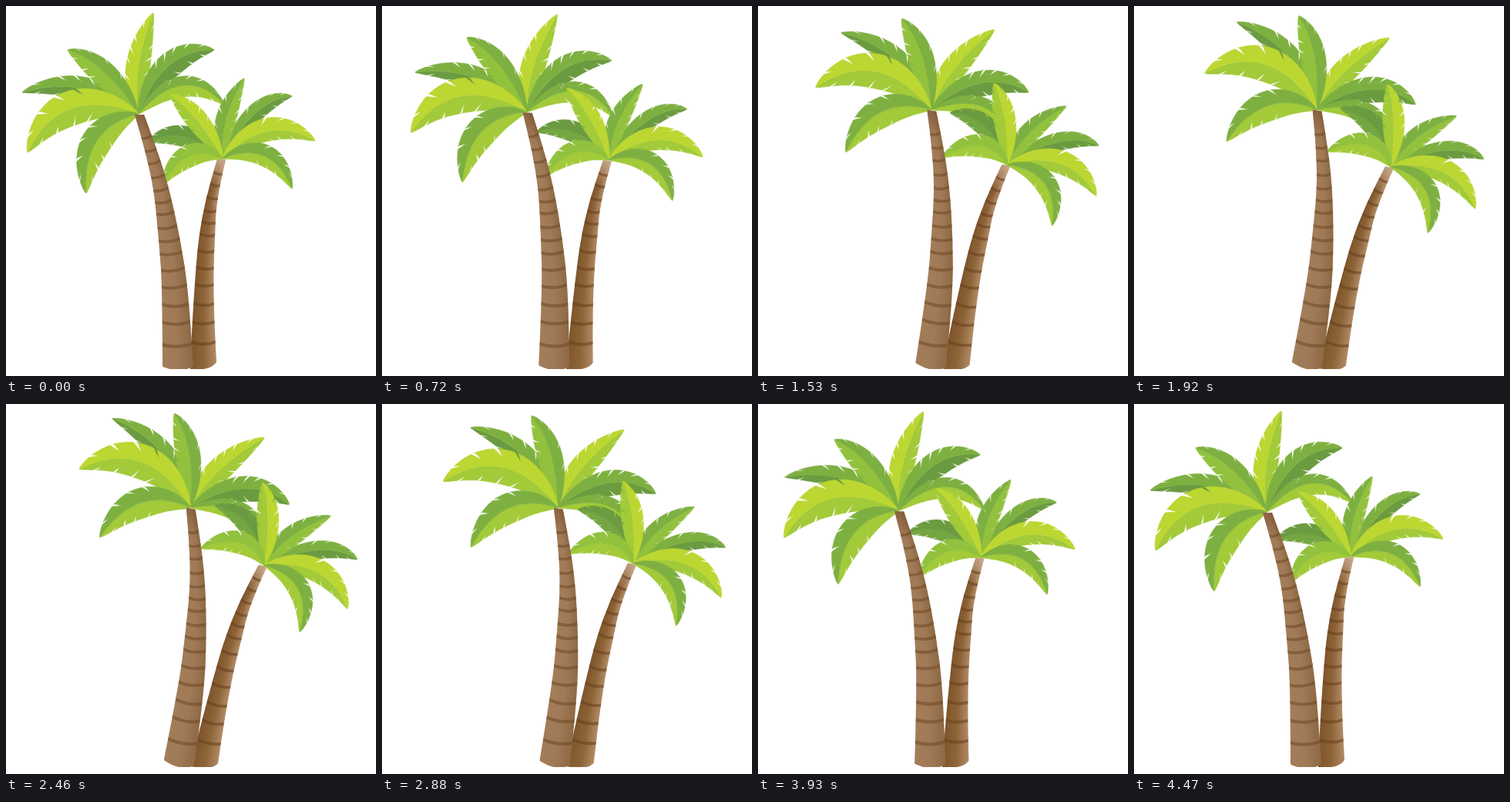
Recreate the animation shown at these times as an HTML page with a canvas. Size 480 by 480 pixels, loop 4.5 s.

```html
<!DOCTYPE html>
<html>
<head>
<meta charset="utf-8">
<title>Swaying palms</title>
<style>
  html, body { margin: 0; width: 100%; height: 100%; overflow: hidden; background: #fff; }
  canvas { display: block; width: 480px; height: 480px; }
</style>
</head>
<body>
<canvas id="stage" width="480" height="480"></canvas>
<script>
const ctx = document.getElementById('stage').getContext('2d');
const LOOP = 4500, STEP = 30;
const TRUNK_SWAY = 11.6 * Math.PI / 180;
const CROWN_SWAY = 27.6 * Math.PI / 180;

const BRIGHT = '#bcd632', LIGHT = '#a2ca39', FRESH = '#92c13d';
const MID = '#7eb041', DEEP = '#74a641', DARK = '#6b9b40';

// Leaf: rib control x, y, tip x, y, upper width, lower width, upper colour, lower colour.
// Trunk edge: y, left x, right x.
const backPalm = {
  pivot: [251, 474],
  crown: [281, 198],
  edge: [[199, 274, 285], [250, 259, 273], [300, 250, 271], [345, 246, 269], [405, 242, 270], [462, 239, 273]],
  foot: [266, 473, 239, 472],
  bands: [217, 232, 249, 266, 281, 297, 318, 340, 362, 387, 411, 437],
  tones: ['#7f552c', '#8d6337', '#b08a66'],
  bandTone: 'rgba(103,63,28,0.55)',
  topTone: 'rgba(214,184,160,0.75)',
  leaves: [
    [322, 120, 371, 117, 12, 11, MID, DARK],
    [232, 152, 183, 177, 14, 13, DARK, DEEP],
    [276, 147, 309, 94, 13, 13, MID, FRESH],
    [249, 140, 213, 115, 14, 14, BRIGHT, LIGHT],
    [339, 138, 401, 175, 17, 13, BRIGHT, LIGHT],
    [234, 175, 203, 232, 15, 14, FRESH, LIGHT],
    [344, 172, 371, 237, 15, 13, MID, LIGHT]
  ]
};

const frontPalm = {
  pivot: [233, 474],
  crown: [172, 140],
  edge: [[141, 167, 179], [186, 180, 196], [238, 192, 212], [302, 198, 226], [365, 203, 236], [467, 203, 243]],
  foot: [227, 478, 204, 468],
  bands: [170, 187, 203, 221, 238, 254, 269, 287, 304, 321, 342, 364, 388, 411, 440],
  tones: ['#a37d59', '#a07a57', '#8e6944'],
  bandTone: 'rgba(112,74,38,0.55)',
  topTone: 'rgba(120,80,48,0.55)',
  leaves: [
    [103, 88, 21, 112, 15, 13, MID, DARK],
    [162, 81, 191, 9, 16, 15, BRIGHT, LIGHT],
    [130, 74, 80, 57, 14, 18, MID, FRESH],
    [203, 55, 270, 57, 16, 17, MID, DARK],
    [232, 72, 283, 128, 12, 15, MID, LIGHT],
    [70, 101, 28, 190, 23, 22, BRIGHT, LIGHT],
    [98, 158, 104, 243, 19, 20, MID, LIGHT]
  ]
};

function random(seed) {
  return () => {
    seed = (seed * 16807) % 2147483647;
    return seed / 2147483647;
  };
}

// One half of a frond: rib outward to the tip, ragged edge back to the base.
function halfLeaf([bx, by], [cx, cy, tx, ty], width, side, rnd) {
  const flip = tx < bx ? -side : side;
  const at = (t, depth = 1) => {
    const u = 1 - t;
    const dx = u * (cx - bx) + t * (tx - cx);
    const dy = u * (cy - by) + t * (ty - cy);
    const w = flip * width * depth * Math.sin(Math.PI * t) ** 0.75 / Math.hypot(dx, dy);
    return [
      u * u * bx + 2 * u * t * cx + t * t * tx + dy * w,
      u * u * by + 2 * u * t * cy + t * t * ty - dx * w
    ];
  };
  const path = new Path2D();
  path.moveTo(bx, by);
  path.quadraticCurveTo(cx, cy, tx, ty);
  let next = 0.92;
  for (let t = 0.99; t > 0; t -= 0.02) {
    path.lineTo(...at(t));
    if (t < next && t > 0.36) {
      path.lineTo(...at(t - 0.07, 0.4 + rnd() * 0.35));
      path.lineTo(...at(t - 0.025, 1.03));
      next = t - 0.09 - rnd() * 0.1;
    }
  }
  path.closePath();
  return path;
}

function trunkPath({ edge, foot }) {
  const path = new Path2D();
  const left = edge.map(([y, x]) => [x, y]);
  const right = edge.map(([y, , x]) => [x, y]);
  const trace = pts => {
    path.lineTo(...pts[0]);
    for (let i = 1; i < pts.length - 1; i++) {
      const [x, y] = pts[i], [nx, ny] = pts[i + 1];
      path.quadraticCurveTo(x, y, (x + nx) / 2, (y + ny) / 2);
    }
    path.lineTo(...pts[pts.length - 1]);
  };
  path.moveTo(...left[0]);
  trace(right);
  path.quadraticCurveTo(...foot);
  trace(left.reverse());
  path.closePath();
  return path;
}

function section(edge, y) {
  let i = 1;
  while (i < edge.length - 1 && edge[i][0] < y) i++;
  const [y0, l0, r0] = edge[i - 1], [y1, l1, r1] = edge[i];
  const k = (y - y0) / (y1 - y0);
  const left = l0 + (l1 - l0) * k, right = r0 + (r1 - r0) * k;
  return {
    x: (left + right) / 2,
    half: (right - left) / 2,
    lean: Math.atan2((l0 + r0 - l1 - r1) / 2, y1 - y0)
  };
}

function prepare(palm, seed) {
  const rnd = random(seed);
  palm.trunk = trunkPath(palm);
  palm.fronds = palm.leaves.map(leaf => {
    const [, , , , upper, lower, upperTone, lowerTone] = leaf;
    return [
      [halfLeaf(palm.crown, leaf, lower, -1, rnd), lowerTone],
      [halfLeaf(palm.crown, leaf, upper, 1, rnd), upperTone]
    ];
  });
}

function turn([x, y], angle) {
  ctx.translate(x, y);
  ctx.rotate(angle);
  ctx.translate(-x, -y);
}

function drawTrunk(palm, sway) {
  ctx.save();
  turn(palm.pivot, sway * TRUNK_SWAY);
  ctx.clip(palm.trunk);
  const top = palm.edge[0][0];
  // Shade each slice across its own width so the light follows the bend.
  for (let y = top - 3; y < 480; y += 3) {
    const { x, half } = section(palm.edge, y);
    const shade = ctx.createLinearGradient(x - half, 0, x + half, 0);
    palm.tones.forEach((tone, i) => shade.addColorStop(i / 2, tone));
    ctx.fillStyle = shade;
    ctx.fillRect(x - half - 8, y, half * 2 + 16, 4);
  }
  const cap = ctx.createLinearGradient(0, top, 0, top + 36);
  cap.addColorStop(0, palm.topTone);
  cap.addColorStop(1, palm.topTone.replace(/[\d.]+\)$/, '0)'));
  ctx.fillStyle = cap;
  ctx.fillRect(palm.crown[0] - 30, top - 4, 60, 40);
  ctx.strokeStyle = palm.bandTone;
  for (const y of palm.bands) {
    const { x, half, lean } = section(palm.edge, y);
    ctx.save();
    ctx.translate(x, y);
    ctx.rotate(lean);
    ctx.lineWidth = 3 + half * 0.06;
    ctx.beginPath();
    ctx.moveTo(-half - 3, -2);
    ctx.quadraticCurveTo(0, 3 + half * 0.14, half + 3, -2);
    ctx.stroke();
    ctx.restore();
  }
  ctx.restore();
}

function drawCrown(palm, sway) {
  ctx.save();
  turn(palm.pivot, sway * TRUNK_SWAY);
  turn(palm.crown, sway * CROWN_SWAY);
  for (const frond of palm.fronds) {
    for (const [path, tone] of frond) {
      ctx.fillStyle = ctx.strokeStyle = tone;
      ctx.lineWidth = 0.5;
      ctx.fill(path);
      ctx.stroke(path);
    }
  }
  ctx.restore();
}

function draw(now) {
  const time = Math.floor((now % LOOP) / STEP) * STEP;
  const sway = (1 - Math.cos(2 * Math.PI * time / LOOP)) / 2;
  ctx.fillStyle = '#fff';
  ctx.fillRect(0, 0, 480, 480);
  ctx.save();
  ctx.beginPath();
  ctx.rect(0, 0, 480, 471);
  ctx.clip();
  drawCrown(frontPalm, sway);
  drawTrunk(backPalm, sway);
  drawCrown(backPalm, sway);
  drawTrunk(frontPalm, sway);
  ctx.restore();
}

prepare(backPalm, 4177);
prepare(frontPalm, 9203);

const start = performance.now();
function tick() {
  draw(performance.now() - start);
  requestAnimationFrame(tick);
}
tick();
</script>
</body>
</html>
```
